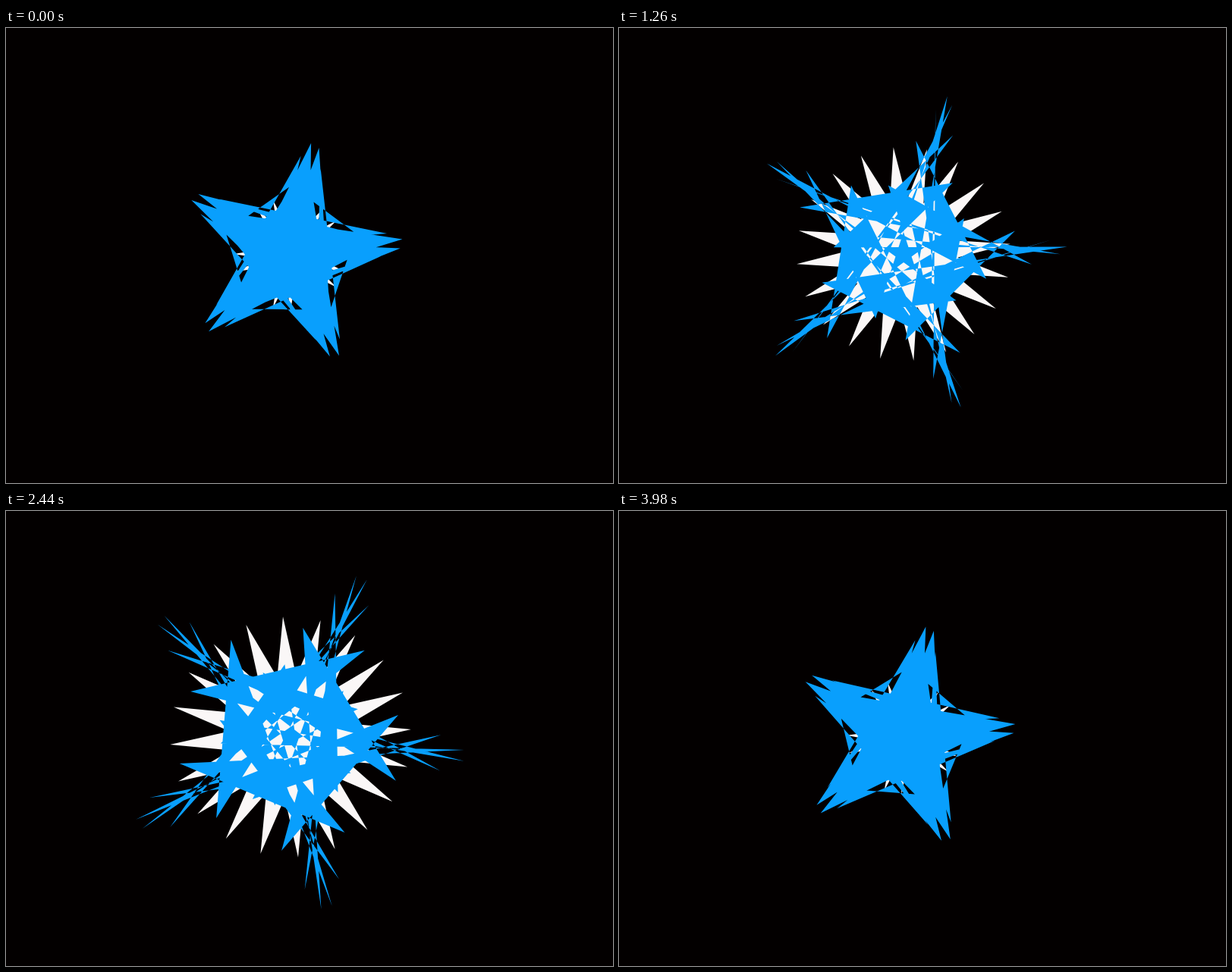
An HTML page with a canvas for the animation above (4000 ms loop, 800x600 px).

```html
<!DOCTYPE html>
<html lang="en">
<head>
<meta charset="utf-8">
<title>Spinning stars</title>
<style>
  html, body { margin: 0; width: 100%; height: 100%; overflow: hidden; background: #030000; }
  canvas { display: block; }
</style>
</head>
<body>
<canvas id="stage" width="800" height="600"></canvas>
<script>
const ctx = document.getElementById('stage').getContext('2d');
const LOOP = 4000, STEP = 20, TAU = Math.PI * 2, DEG = TAU / 360;
const CX = 375, CY = 298, ORBIT = 75, CORNERS = 40;

// Chords of a 20-point star whose corners are also carried around a circle.
// 40 corners make 18 turns of the star and 7 opposite turns of the circle.
function drawStar(radius, spin, orbit, color) {
  ctx.beginPath();
  for (let i = 0; i < CORNERS; i++) {
    const a = spin + 162 * i * DEG;
    const b = (15 - 63 * i) * DEG;
    ctx.lineTo(CX + radius * Math.cos(a) + orbit * Math.cos(b),
               CY - radius * Math.sin(a) - orbit * Math.sin(b));
  }
  ctx.closePath();
  ctx.fillStyle = color;
  ctx.fill();
}

function draw(ms) {
  const spin = Math.floor(ms % LOOP / STEP) * STEP / LOOP * TAU;
  const radius = 122.5 - 47.5 * Math.cos(spin);
  ctx.fillStyle = '#030000';
  ctx.fillRect(0, 0, 800, 600);
  drawStar(radius, spin, 0, '#faf7f7');
  drawStar(radius, spin, ORBIT, '#099ffd');
}

const start = performance.now();
function tick() {
  draw(performance.now() - start);
  requestAnimationFrame(tick);
}
tick();
</script>
</body>
</html>
```
